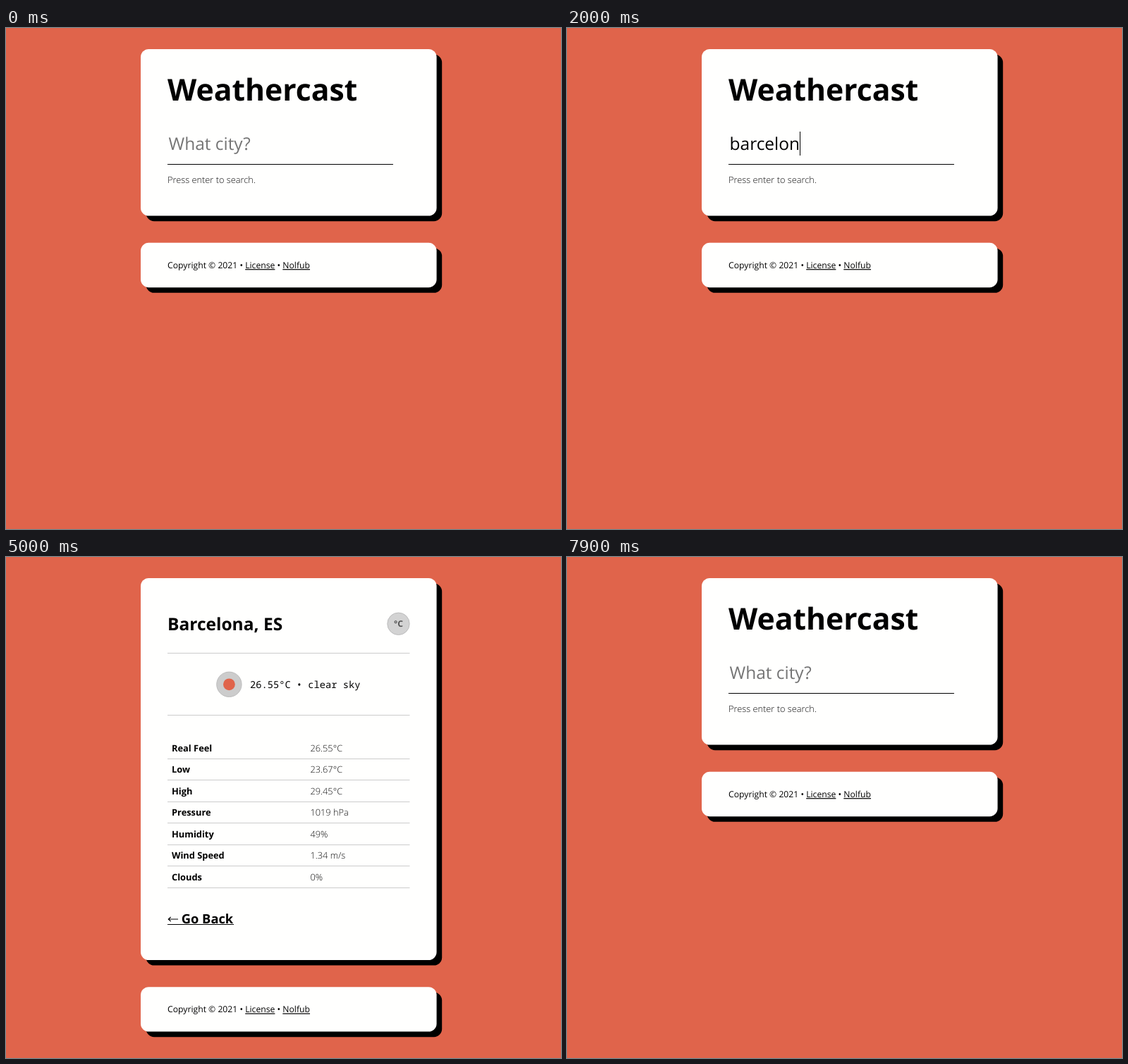
Write an HTML page that moves like this. It is 787 px wide and 711 px high and loops after 9.3 s.

```html
<!DOCTYPE html>
<html lang="en">
<head>
<meta charset="utf-8">
<title>Weathercast</title>
<style>
  html, body { margin: 0; width: 100%; height: 100%; overflow: hidden; background: #e0644b; }
  svg { display: block; width: 787px; height: 711px; }
  text { font-family: "Open Sans", sans-serif; font-size: 12.2px; white-space: pre; text-rendering: geometricPrecision; }
  .title { font-size: 42.7px; font-weight: 700; }
  .city { font-size: 24.5px; font-weight: 700; }
  .input { font-size: 24.5px; }
  .back { font-size: 18.3px; font-weight: 700; }
  .mono { font-family: "Roboto Mono", "Noto Sans Mono", monospace; font-size: 13.73px; }
  .label { font-size: 12.85px; font-weight: 700; }
  .light { font-size: 12.8px; font-weight: 300; fill: #111; }
  .unit { font-weight: 700; fill: #555; text-anchor: middle; }
  .link { text-decoration: underline; }
  .rule { fill: #ccc; }
</style>
</head>
<body>
<svg viewBox="0 0 787 711">
  <defs>
    <g id="footer">
      <rect x="198.6" y="7.6" width="419.6" height="63.4" rx="11.4"/>
      <rect x="191" width="419.6" height="63.4" rx="11.4" fill="#fffffe"/>
      <text x="229" y="36.3">Copyright © 2021 • <tspan class="link">License</tspan> • <tspan class="link">Nolfub</tspan></text>
    </g>
  </defs>

  <g id="search">
    <rect x="198.6" y="37.6" width="419.6" height="236.6" rx="11.4"/>
    <rect x="191" y="30" width="419.6" height="236.6" rx="11.4" fill="#fffffe"/>
    <text class="title" x="229" y="102.5">Weathercast</text>
    <text class="input" id="query" x="230.5" y="173.3"></text>
    <rect id="caret" y="147" width="1" height="34"/>
    <rect x="229" y="193" width="320" height="1"/>
    <text class="light" x="229" y="220">Press enter to search.</text>
    <use href="#footer" y="304.8"/>
  </g>

  <g id="result">
    <rect x="198.6" y="37.6" width="419.6" height="542" rx="11.4"/>
    <rect x="191" y="30" width="419.6" height="542" rx="11.4" fill="#fffffe"/>
    <text class="city" x="229" y="103.5">Barcelona, ES</text>
    <circle id="button" cx="556.5" cy="94.8" r="15.7" stroke="#b8b8b8" stroke-width=".9"/>
    <text class="unit" id="unit" x="556.5" y="99.3"></text>
    <rect class="rule" x="229" y="136" width="343.5" height="1"/>
    <circle cx="316.4" cy="180.8" r="17.7" fill="#ccc" stroke="#b8b8b8" stroke-width=".9"/>
    <circle cx="316.4" cy="180.8" r="8.4" fill="#e0644b"/>
    <text class="mono" id="now" x="346" y="186"></text>
    <rect class="rule" x="229" y="224" width="343.5" height="1"/>
    <g id="table"></g>
    <path d="M244 514H230.5M233.7 510.9L230.3 514L233.7 517.1" fill="none" stroke="#000" stroke-width="1.2"/>
    <text class="back" x="248.8" y="520">Go Back</text>
    <rect id="line" x="229" y="521" width="94" height="1"/>
    <use href="#footer" y="610.2"/>
  </g>
</svg>

<script>
const LOOP = 9300;
const $ = id => document.getElementById(id);

// Each track is a list of [start time, value]; a value holds until the next one.
const tracks = {
  page: [[0, "search"], [3300, "result"], [7900, "search"]],
  query: [[0, ""], [800, "b"], [900, "ba"], [1100, "bar"], [1300, "barc"], [1400, "barce"],
          [1800, "barcel"], [2000, "barcelon"], [2100, "barcelona"], [3300, ""]],
  caret: [[0, false], [300, true], [1500, false], [1800, true], [2700, false]],
  button: [[0, "#ccc"], [5000, "#d3d3d3"], [5100, "#dadada"], [7100, "#d3d3d3"], [7200, "#ccc"]],
  unit: [[0, "C"], [5500, "F"], [6700, "C"]],
  line: [[0, true], [7500, false]]
};

const rows = [
  ["Real Feel", 26.55], ["Low", 23.67], ["High", 29.45],
  ["Pressure", "1019 hPa"], ["Humidity", "49%"], ["Wind Speed", "1.34 m/s"], ["Clouds", "0%"]
];

function add(tag, attrs, text = "") {
  const el = document.createElementNS("http://www.w3.org/2000/svg", tag);
  for (const key in attrs) el.setAttribute(key, attrs[key]);
  el.textContent = text;
  return $("table").appendChild(el);
}

const cells = rows.map(([label], i) => {
  const y = 275.8 + i * 30.53;
  add("text", { class: "label", x: 235, y }, label);
  add("rect", { class: "rule", x: 229, y: Math.round(y + 9.9), width: 343.5, height: 1 });
  return add("text", { class: "light", x: 431.4, y });
});

const at = (name, t) => tracks[name].findLast(([start]) => start <= t)[1];
const show = (el, on) => el.setAttribute("visibility", on ? "inherit" : "hidden");
const degrees = (c, unit) => (unit === "F" ? c * 1.8 + 32 : c).toFixed(2) + "°" + unit;

function draw(t) {
  const page = at("page", t), query = at("query", t), unit = at("unit", t);
  for (const id of ["search", "result"]) show($(id), id === page);

  $("query").textContent = query || "What city?";
  $("query").setAttribute("fill", query ? "#000" : "#757575");
  const width = query ? $("query").getComputedTextLength() : 0;
  $("caret").setAttribute("x", Math.round(230.3 + width));
  show($("caret"), at("caret", t));

  $("button").setAttribute("fill", at("button", t));
  $("unit").textContent = "°" + unit;
  $("now").textContent = degrees(26.55, unit) + " • clear sky";
  rows.forEach(([, value], i) => {
    cells[i].textContent = typeof value === "number" ? degrees(value, unit) : value;
  });
  show($("line"), at("line", t));
}

const began = performance.now();
function tick() {
  draw((performance.now() - began) % LOOP);
  requestAnimationFrame(tick);
}
tick();
</script>
</body>
</html>
```
